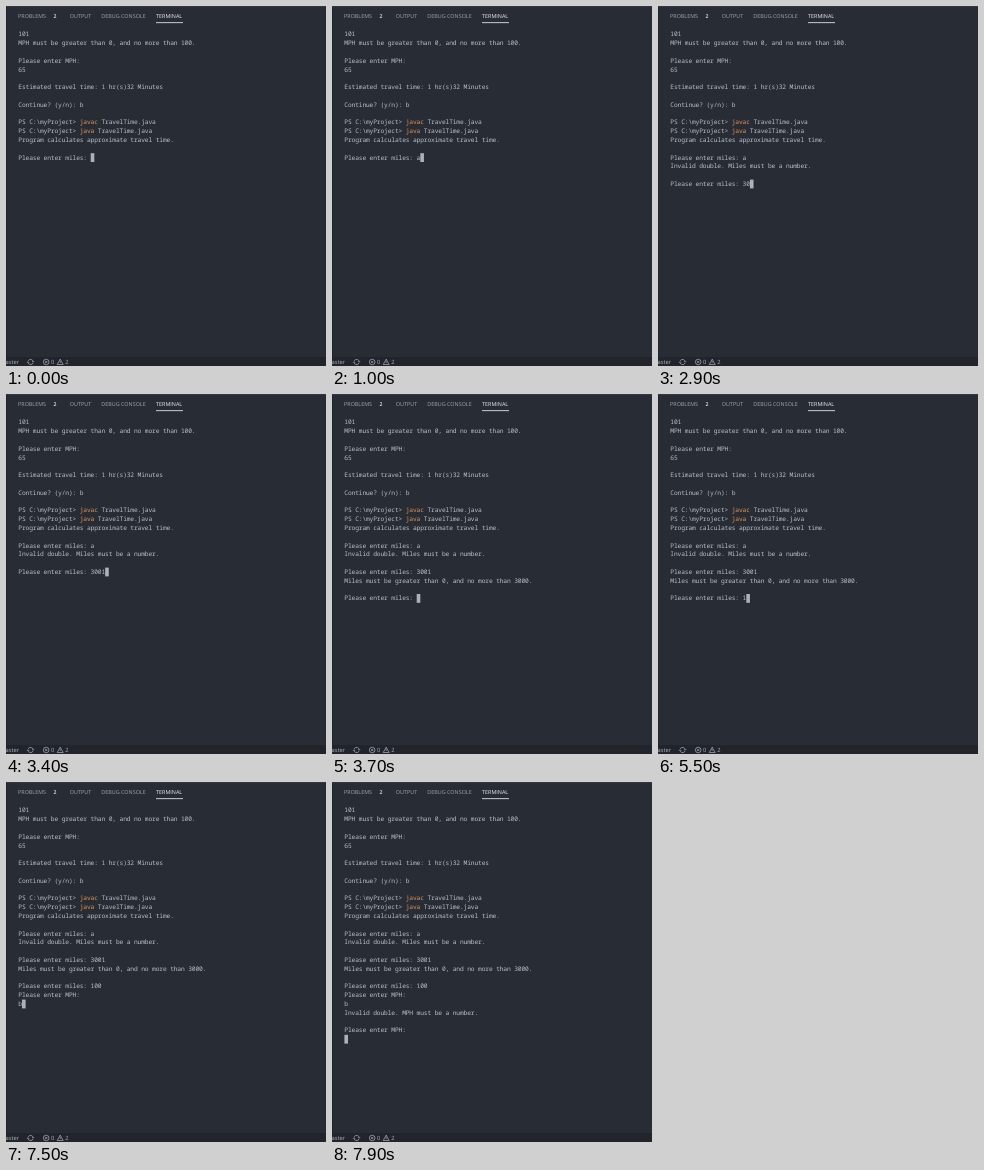
These frames come from a looping animation (320 by 360 pixels, 8 s). An HTML page with a canvas:

```html
<!DOCTYPE html>
<html lang="en">
<head>
<meta charset="utf-8">
<title>Terminal session</title>
<style>
  html, body { margin: 0; width: 100%; height: 100%; overflow: hidden; background: #282c34; }
  canvas { display: block; width: 320px; height: 360px; }
</style>
</head>
<body>
<canvas id="stage" width="320" height="360"></canvas>
<script>
const ctx = document.getElementById('stage').getContext('2d');

const LOOP = 8000;
const LEFT = 12.4, TOP = 24, ROW = 8.8, COL = 3.615;
const MONO = '"Noto Sans Mono", "DejaVu Sans Mono", monospace';
const SANS = '"Open Sans", "Noto Sans", sans-serif';
const COLORS = {
  panel: '#282c34', bar: '#21252b', edge: '#3b4048',
  text: '#b9c0cc', command: '#e2945a', cursor: '#abb2bf',
  tab: '#a3a8b1', active: '#f0f1f4', status: '#a9b1bf'
};

const PROMPT = 'PS C:\\myProject> ';
const ASK_MILES = 'Please enter miles: ';
const ASK_MPH = 'Please enter MPH:\n';

const HISTORY = [
  '101',
  'MPH must be greater than 0, and no more than 100.',
  '',
  'Please enter MPH:',
  '65',
  '',
  'Estimated travel time: 1 hr(s)32 Minutes',
  '',
  'Continue? (y/n): b',
  '',
  PROMPT + 'javac TravelTime.java',
  PROMPT + 'java TravelTime.java',
  'Program calculates approximate travel time.',
  '',
  ASK_MILES
].join('\n');

// [time in ms, text appended to the terminal]
const EVENTS = [
  [900, 'a'],
  [1100, '\nInvalid double. Miles must be a number.\n\n' + ASK_MILES],
  [2600, '3'],
  [2800, '0'],
  [3000, '0'],
  [3300, '1'],
  [3500, '\nMiles must be greater than 0, and no more than 3000.\n\n' + ASK_MILES],
  [5500, '1'],
  [5700, '0'],
  [5800, '0'],
  [6200, '\n' + ASK_MPH],
  [7500, 'b'],
  [7900, '\nInvalid double. MPH must be a number.\n\n' + ASK_MPH]
];

// Lay text out large and scale down so small sizes keep exact advances;
// the tiny skew stops hinting and baseline snapping.
function label(str, x, y, size, family, color, weight = 400) {
  const zoom = 20, skew = 1e-5;
  ctx.save();
  ctx.transform(1 / zoom, skew, skew, 1 / zoom, x, y);
  ctx.font = `${weight} ${size * zoom}px ${family}`;
  ctx.textRendering = 'geometricPrecision';
  ctx.fillStyle = color;
  ctx.fillText(str, 0, 0);
  ctx.restore();
}

function rect(x, y, w, h, color) {
  ctx.fillStyle = color;
  ctx.fillRect(x, y, w, h);
}

function stroke(points) {
  ctx.beginPath();
  points.forEach(([x, y], i) => i ? ctx.lineTo(x, y) : ctx.moveTo(x, y));
  ctx.stroke();
}

function arc(x, y, r, from = 0, to = Math.PI * 2) {
  ctx.beginPath();
  ctx.arc(x, y, r, from, to);
  ctx.stroke();
}

function drawTabs() {
  const tab = (str, x, color) => label(str, x, 11.8, 5.43, SANS, color, 500);
  tab('PROBLEMS', 12, COLORS.tab);
  label('2', 47.4, 11.7, 5.2, SANS, COLORS.active, 600);
  tab('OUTPUT', 63.8, COLORS.tab);
  tab('DEBUG CONSOLE', 95.2, COLORS.tab);
  tab('TERMINAL', 150, COLORS.active);
  rect(150, 16.3, 27, 0.8, COLORS.active);
}

function drawStatus() {
  const y = 356;
  rect(0, 351, 320, 9, COLORS.bar);
  const word = (str, x) => label(str, x, y + 2.1, 5.8, SANS, COLORS.status, 500);
  word('aster', -0.6);
  word('0', 45);
  word('2', 59.3);

  ctx.strokeStyle = COLORS.status;
  ctx.lineWidth = 0.7;
  // sync arrows
  arc(24.6, y, 2.6, Math.PI * 1.1, Math.PI * 1.95);
  arc(24.6, y, 2.6, Math.PI * 0.1, Math.PI * 0.95);
  stroke([[26.2, y - 0.8], [27.2, y + 0.2], [28.1, y - 0.8]]);
  stroke([[21.1, y + 0.8], [22, y - 0.2], [23, y + 0.8]]);
  // errors
  arc(40.2, y, 2.8);
  stroke([[39, y - 1.2], [41.4, y + 1.2]]);
  stroke([[41.4, y - 1.2], [39, y + 1.2]]);
  // warnings
  stroke([[54.2, y - 2.7], [57.2, y + 2.5], [51.2, y + 2.5], [54.2, y - 2.7], [54.6, y - 2]]);
  stroke([[54.2, y - 0.9], [54.2, y + 0.9]]);
}

// Glyphs sit on the terminal's character grid.
function drawCells(str, row, col, color) {
  [...str].forEach((char, i) =>
    label(char, LEFT - 0.1 + (col + i) * COL, TOP + row * ROW + 6.4, 6.3, MONO, color, 500));
}

function drawLine(str, row) {
  if (!str.startsWith(PROMPT)) return drawCells(str, row, 0, COLORS.text);
  const [command, file] = str.slice(PROMPT.length).split(' ');
  drawCells(PROMPT, row, 0, COLORS.text);
  drawCells(command, row, PROMPT.length, COLORS.command);
  drawCells(file, row, PROMPT.length + command.length + 1, COLORS.text);
}

function drawTerminal(t) {
  const typed = EVENTS.filter(([at]) => at <= t).map(([, str]) => str).join('');
  const lines = (HISTORY + typed).split('\n');
  const last = lines.length - 1;
  lines.forEach(drawLine);
  rect(LEFT + lines[last].length * COL, TOP + last * ROW, COL, ROW, COLORS.cursor);
}

function draw(t) {
  rect(0, 0, 320, 360, COLORS.panel);
  rect(0, 0, 1, 351, COLORS.bar);
  rect(0, 0, 320, 0.6, COLORS.edge);
  drawTabs();
  drawTerminal(t);
  drawStatus();
}

const start = performance.now();
function tick(now) {
  draw(Math.max(0, now - start) % LOOP);
  requestAnimationFrame(tick);
}
draw(0);
requestAnimationFrame(tick);
</script>
</body>
</html>
```
